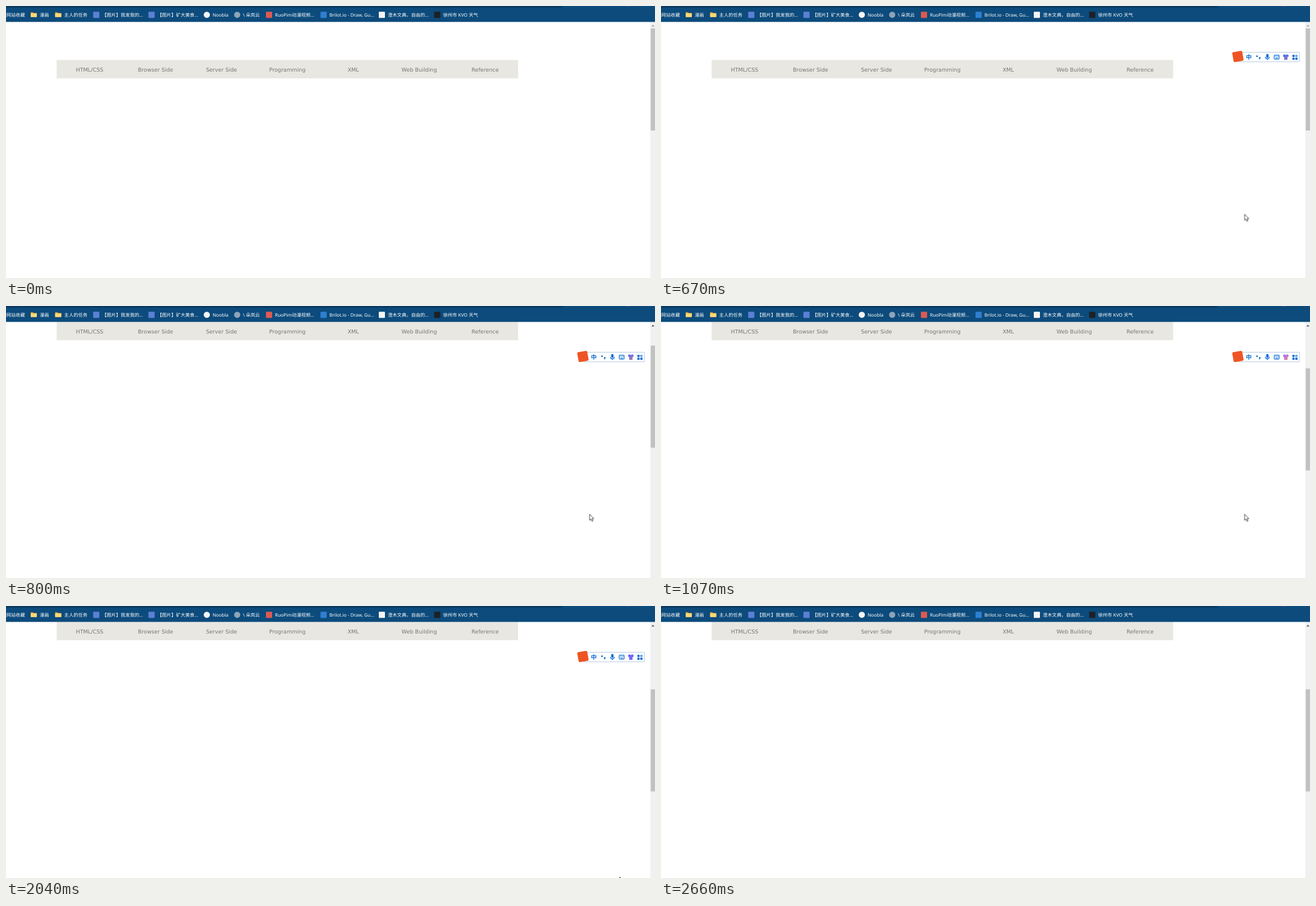
Recreate the animation shown at these times as an HTML page. Size 1156 by 485 pixels, loop 2790 ms.

```html
<!DOCTYPE html>
<html lang="zh-CN">
<head>
<meta charset="utf-8">
<title>Sticky menu</title>
<style>
  html, body { margin: 0; width: 100%; height: 100%; overflow: hidden; background: #fff; }
  svg { display: block; width: 1156px; height: 485px; text-rendering: geometricPrecision; }
  .menu text { font: 9.6px "DejaVu Sans", Verdana, sans-serif; fill: #777; text-anchor: middle; }
  .marks text { font: 8.3px "Noto Sans", "Noto Sans CJK SC", "Noto Sans CJK", sans-serif; fill: #fff; white-space: pre; }
  .ime text { font: 700 10.5px "Noto Sans CJK SC", "Noto Sans CJK", sans-serif; }
</style>
</head>
<body>
<svg viewBox="0 0 1156 485">
  <defs>
    <linearGradient id="dye" x1="0" y1="0" x2="1" y2="1">
      <stop id="dyeA" offset=".35" stop-color="#5570f5"/>
      <stop id="dyeB" offset="1" stop-color="#b08a88"/>
    </linearGradient>
  </defs>

  <g class="menu" id="menu">
    <rect x="90.2" y="96.4" width="822" height="32.6" fill="#e8e7e2"/>
  </g>

  <rect x="1147.5" y="28" width="8.5" height="457" fill="#f1f1f1"/>
  <path id="arrow" d="M1149.7 36.4 1152.3 33.6 1154.9 36.4Z" fill="#a0a0a0"/>
  <rect id="thumb" x="1148.4" y="40" width="7.6" height="182" fill="#c1c1c1"/>

  <g class="marks" id="marks">
    <rect width="1156" height="28.4" fill="#0c4b7c"/>
    <path d="M0 0H994Q992 3 986 3H0Z" fill="#0a3a61"/>
    <path d="M1105.5 0h6q-3 1.6-6 0z" fill="#b5433f"/>
  </g>

  <g class="ime" id="ime" fill="#0a6dd6">
    <rect x="1028.5" y="82.5" width="109" height="17" rx="1.5" fill="#fff" stroke="#b4cbe4"/>
    <rect x="1018.6" y="81" width="18" height="18" rx="2.5" fill="#ee5524" transform="rotate(-10 1027.6 90)"/>
    <text x="1041.8" y="95">中</text>
    <circle cx="1061.6" cy="89.5" r="1.5"/>
    <path d="M1065 91.3h2.8v1.6q-.2 2-2.3 2.6l-.3-.8q1-.5 1.1-1.2h-1.3z"/>
    <rect x="1078" y="85.6" width="4.2" height="7" rx="2.1"/>
    <path d="M1076.4 90.6q.2 3.6 3.7 3.6t3.7-3.6M1080.1 94v2.6" fill="none" stroke="#0a6dd6" stroke-width="1.2"/>
    <rect x="1092.2" y="87.6" width="8.9" height="7" rx="1" fill="none" stroke="#0a6dd6" stroke-width="1.2"/>
    <path d="M1093.8 89.7h6M1093.8 91.2h6" stroke="#0a6dd6" stroke-dasharray="1.2"/>
    <path d="M1094.8 93h4" stroke="#0a6dd6"/>
    <path d="M1110.6 86Q1113 88.4 1115.4 86L1118.2 88 1117.2 91.2 1116 90.8V96H1110V90.8L1108.8 91.2 1107.8 88Z" fill="url(#dye)"/>
    <rect x="1124.6" y="87" width="4" height="4" rx="1"/>
    <rect x="1124.6" y="92" width="4" height="4" rx="1"/>
    <rect x="1129.8" y="92" width="4" height="4" rx="1"/>
    <circle cx="1131.8" cy="89" r="1.5" fill="none" stroke="#0a6dd6" stroke-width="1.2"/>
  </g>

  <path id="cursor" d="M0 0V10.9L2.5 8.6 4.2 12.6 6.1 11.8 4.4 7.9H7.6Z"
        fill="#fff" stroke="#222" stroke-width=".9" stroke-linejoin="round"/>
</svg>
<script>
const LOOP = 2790;
const $ = id => document.getElementById(id);

function add(parent, tag, attrs, text = '') {
  const el = document.createElementNS('http://www.w3.org/2000/svg', tag);
  for (const key in attrs) el.setAttribute(key, attrs[key]);
  el.textContent = text;
  parent.append(el);
}

['HTML/CSS', 'Browser Side', 'Server Side', 'Programming', 'XML', 'Web Building', 'Reference']
  .forEach((label, i) => add($('menu'), 'text', { x: 90.2 + (i + .5) * 822 / 7, y: 116.5 }, label));

const icons = {
  folder(x) {
    add($('marks'), 'path', { d: `M${x} 11.2h4l1.3 1.4h5.7v7h-11z`, fill: '#e2a93f' });
    add($('marks'), 'rect', { x, y: 13.2, width: 11, height: 6.6, rx: .8, fill: '#fbd879' });
  },
  square: (x, fill) => add($('marks'), 'rect', { x, y: 10.3, width: 11, height: 11, rx: 1, fill }),
  circle: (x, fill) => add($('marks'), 'circle', { cx: x + 5.5, cy: 15.7, r: 5.5, fill }),
};

// text x, label, icon, icon x, icon colour
[
  [.5, '网站收藏'],
  [60, '漫画', 'folder', 44],
  [103.6, '主人的任务', 'folder', 87.5],
  [171, '【图片】我发我的...', 'square', 155.3, '#5b7fd6'],
  [269.5, '【图片】矿大美食...', 'square', 253.7, '#5b7fd6'],
  [368, 'Noobla', 'circle', 352.2, '#f4f4f4'],
  [422, '\\ 朵岚云', 'circle', 406.3, '#8fa3b8'],
  [479, 'RuoPim动漫视频...', 'square', 463, '#dc5a52'],
  [576, 'Brilot.io - Draw, Gu...', 'square', 560.2, '#2f7fd0'],
  [680, '澄木文典，自由的...', 'square', 664, '#f4f4f4'],
  [778.5, '徐州市 KVO 天气', 'square', 762.6, '#1d2126'],
].forEach(([x, label, icon, ix, fill]) => {
  if (icon) icons[icon](ix, fill);
  add($('marks'), 'text', { x, y: 18.6 }, label);
});

const start = document.timeline.currentTime || 0;

// rows: [time, value]; each value holds until the next unless smooth
function play(id, prop, rows, smooth) {
  const frames = [...rows, [LOOP, rows[rows.length - 1][1]]].map(([t, value]) =>
    ({ offset: t / LOOP, [prop]: value, easing: smooth ? 'linear' : 'steps(1, end)' }));
  $(id).animate(frames, { duration: LOOP, iterations: Infinity }).startTime = start;
}

const move = (x, y) => `translate(${x}px, ${y}px)`;

// three wheel notches of 125px
const scroll = [
  [0, 0], [730, 45.5], [800, 106], [870, 124], [940, 162], [1000, 222], [1070, 246],
  [1140, 250], [1280, 290], [1350, 350], [1410, 371], [1480, 375],
];
play('menu', 'transform', scroll.map(([t, y]) => [t, move(0, -Math.min(y, 68))]));
play('thumb', 'transform', scroll.map(([t, y]) => [t, move(0, y * .2895)]));
play('arrow', 'fill', [[0, '#a0a0a0'], [730, '#505050']]);

play('ime', 'visibility', [[0, 'hidden'], [70, 'visible'], [2660, 'hidden']]);

play('cursor', 'transform', [
  [0, 1100, 500], [200, 1093, 478], [270, 1070, 440], [340, 1050, 398], [400, 1041, 375],
  [470, 1039.5, 371.3], [1480, 1038.7, 371.3], [1760, 1039.5, 371.3], [1900, 1042, 377],
  [1970, 1064, 427], [2040, 1093, 483], [2110, 1100, 500],
].map(([t, x, y]) => [t, move(x, y)]));

play('dyeA', 'stopColor', [[0, '#8a6cf2'], [670, '#4f6ef7'], [730, '#5f6cf0'],
  [1070, '#b074ea'], [1550, '#5570f5'], [2040, '#6a68f5']], true);
play('dyeB', 'stopColor', [[0, '#f08a70'], [670, '#d08a80'], [730, '#b08a80'],
  [1070, '#f58a68'], [1550, '#a58a90'], [2040, '#7d70f0']], true);
</script>
</body>
</html>
```
